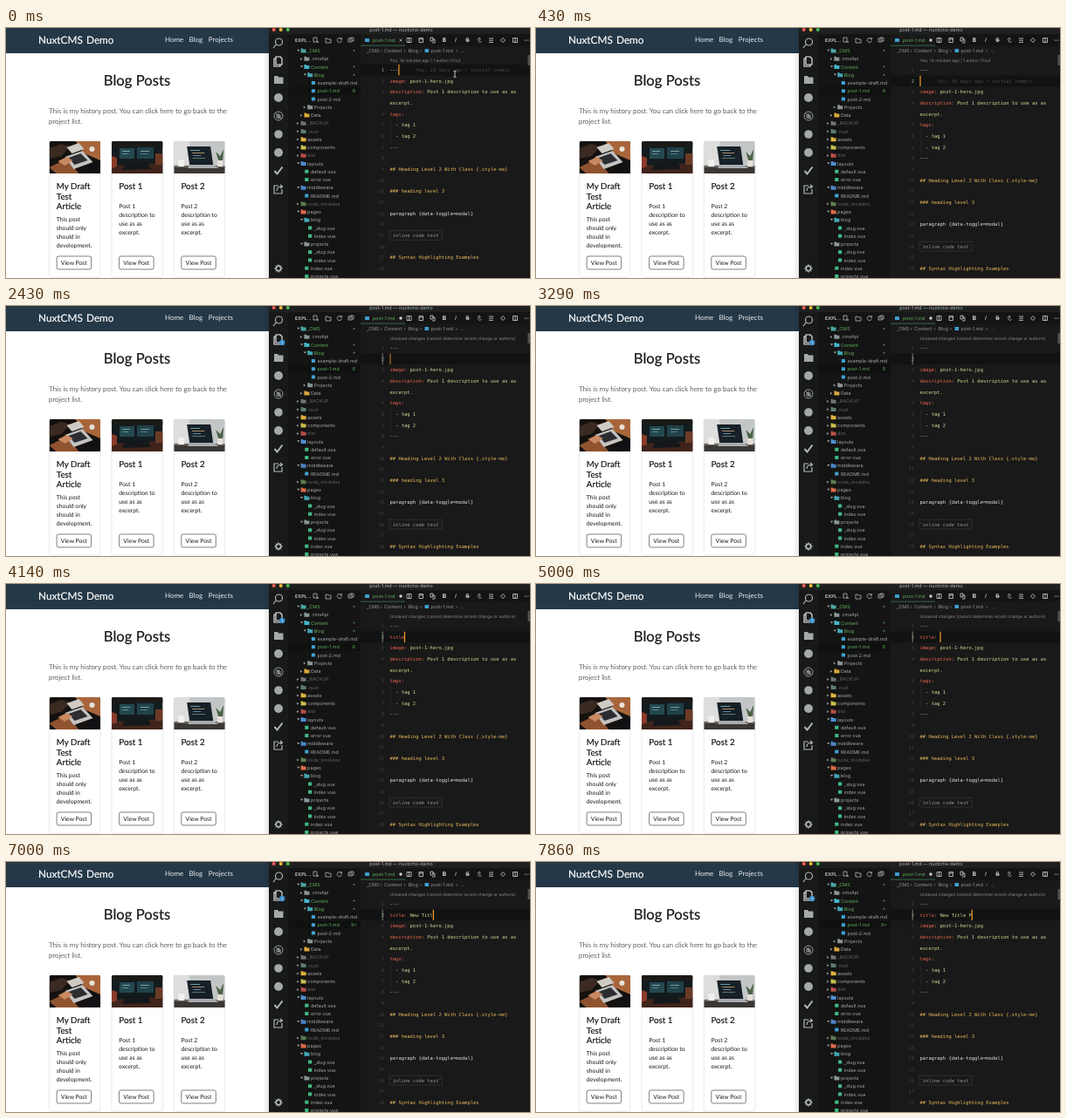
Recreate the animation shown at these times as an HTML page. Size 600 by 287 pixels, loop 8 s.

```html
<!DOCTYPE html>
<html lang="en">
<head>
<meta charset="utf-8">
<title>Blog editor</title>
<style>
html, body { margin: 0; width: 100%; height: 100%; overflow: hidden; background: #fff; }
svg { display: block; width: 600px; height: 287px; }
text { white-space: pre; text-rendering: geometricPrecision; }
.lato { font-family: Lato, sans-serif; fill: #15181b; }
.head { stroke: #15181b; stroke-width: .2; }
.brand { font-size: 11.8px; fill: #fff; stroke: #fff; stroke-width: .2; }
.lead { font-size: 8.05px; font-weight: 300; stroke: #15181b; stroke-width: .06; }
.body { font-size: 6.8px; }
.ui { font-family: Inter, sans-serif; font-size: 5.4px; fill: #a6a8a8; }
.lens { font-size: 4.8px; fill: #8c8e8e; }
.code { font-family: "DejaVu Sans Mono", monospace; font-size: 5.47px; fill: #e2e3da; }
.num { fill: #3e4041; text-anchor: end; }
.line { fill: none; stroke: #b4b8b9; stroke-width: .8; }
</style>
</head>
<body>
<svg id="stage" viewBox="0 0 600 287" xmlns="http://www.w3.org/2000/svg"></svg>
<script>
const LOOP = 8000, ROW = 12.66, LEFT = 439.5, CHAR = 5.47 * .602;
const GREEN = '#62b05c', KEY = '#e8674f', VALUE = '#cbdc92', HEAD = '#e8b95c', BLUE = '#3f9fd0';

const rect = (x, y, w, h, fill, extra = '') =>
  `<rect x="${x}" y="${y}" width="${w}" height="${h}" fill="${fill}" ${extra}/>`;
const dot = (x, y, r, fill) => `<circle cx="${x}" cy="${y}" r="${r}" fill="${fill}"/>`;
const poly = (points, fill) => `<polygon points="${points}" fill="${fill}"/>`;
const line = (d, extra = '') => `<path class="line" d="${d}" ${extra}/>`;
const text = (x, y, str, cls, style = '', id = '') =>
  `<text ${id && `id="${id}"`} x="${x}" y="${y}" class="${cls}" style="${style}">${str}</text>`;
const span = (str, fill) => `<tspan fill="${fill}">${str}</tspan>`;
const rowY = row => 50 + row * ROW;

// Website
const photos = [
  rect(0, 0, 58.5, 37, '#14110f') + poly('0,8 14,3 24,6 14,17 0,20', '#3a2a22') +
  poly('30,0 58.5,0 58.5,22 40,14', '#a8653a') + poly('0,30 20,20 34,37 8,37', '#8f5330') +
  poly('20,7 34,2 40,9 26,14', '#cfcac4') +
  poly('18,18 38,11 50,24 28,32', '#c4c3c1') + poly('22,19 36,14 44,22 29,27', '#2b2d30') +
  poly('10,23 20,18 27,22 18,28', '#c98961') + poly('40,33 47,27 58.5,22 58.5,37', '#101114') +
  dot(49, 9, 3, '#e8e2da'),
  rect(0, 0, 58.5, 37, '#131b1e') + rect(0, 0, 58.5, 6, '#1c1a17') +
  poly('0,28 58.5,25 58.5,37 0,37', '#40241b') + rect(9, 8, 17, 12, '#25484f') +
  rect(29, 7, 19, 13, '#21414a') + rect(12, 11, 9, 1, '#72a4a2') + rect(12, 14, 7, 1, '#5c8f8f') +
  rect(33, 11, 10, 1, '#7aa09b') + rect(33, 14, 8, 1, '#557f80') +
  poly('16,25 41,24 45,32 12,33', '#15181b') + rect(50, 14, 8.5, 13, '#6b3b26') +
  poly('0,17 6,19 6,29 0,31', '#8c3a2a'),
  rect(0, 0, 58.5, 37, '#c3c6c7') + rect(0, 0, 18, 27, '#dcdddc') +
  rect(0, 29, 58.5, 8, '#3b3734') + rect(0, 28, 58.5, 2, '#6e675f') +
  poly('15,6 42,6 45,27 18,27', '#182027') + rect(19, 10, 11, 1, '#65a0a4') +
  rect(21, 13, 14, 1, '#a88e6b') + rect(22, 16, 9, 1, '#608aa0') + rect(21, 19, 15, 1, '#587b72') +
  poly('18,27 45,27 51,31 16,31', '#a8acae') + rect(5, 21, 7, 8, '#f0f0ed', 'rx="1"') +
  poly('51,22 48,12 53,17 57,9 56,22', '#4c6348') + rect(50, 22, 6, 7, '#e6e2da')
];
const cards = [
  [49.5, ['My Draft', 'Test', 'Article'], 222, ['This post', 'should only', 'should in', 'development.']],
  [121, ['Post 1'], 207, ['Post 1', 'description to', 'use as as', 'excerpt.']],
  [192.2, ['Post 2'], 207, ['Post 2', 'description to', 'use as as', 'excerpt.']]
];

function card([x, title, bodyY, body], i) {
  return `<g transform="translate(${x} 130)">` +
    rect(0, .2, 58.5, 156, '#fff', 'rx="1.8" stroke="#dcdcdc" stroke-width=".6"') +
    `<g clip-path="url(#photo)">${photos[i]}</g>` +
    title.map((s, n) => text(8.3, 55 + n * 11.6, s, 'lato head', 'font-size:9.8px')).join('') +
    body.map((s, n) => text(8.3, bodyY - 130 + n * 10.1, s, 'lato body')).join('') +
    rect(8.6, 132, 39.5, 15, '#fff', 'rx="2" stroke="#454b50" stroke-width=".7"') +
    text(28.3, 142, 'View Post', 'lato body', 'text-anchor:middle') + '</g>';
}

const nav = [[182, 'Home'], [209.5, 'Blog'], [231.7, 'Projects']];
const site = rect(0, 0, 301, 287, '#fff') + rect(0, 0, 301, 29, '#243848') +
  text(37, 17.7, 'NuxtCMS', 'lato brand') + text(92, 17.7, 'Demo', 'lato brand') +
  nav.map(([x, s]) => text(x, 16, s, 'lato', 'font-size:8px;fill:#e9edf0')).join('') +
  text(150, 65.5, 'Blog Posts', 'lato head', 'font-size:16.7px;text-anchor:middle') +
  text(49, 98.4, 'This is my history post. You can click here to go back to the', 'lato lead') +
  text(49, 110.4, 'project list.', 'lato lead') +
  cards.map(card).join('') + rect(294, 0, 7, 287, 'url(#edge)');

// Editor chrome
const activity =
  line('M309 19l-3 4M308.5 16a4 4 0 1 0 8 0a4 4 0 1 0-8 0', 'style="stroke-width:1.2"') +
  line('M309 33h5l2 2v7h-7zM309 35h-2v9h7v-2', 'style="stroke:#f4f4f4;stroke-width:1.1"') +
  `<g id="count">${dot(316.2, 42, 3.2, '#3b8fca')}${text(316.2, 43.7, '1', 'ui', 'font-size:4.6px;fill:#fff;text-anchor:middle')}</g>` +
  '<path d="M307 55h4l1.2 1.5h5.3v7.5h-10.5z" fill="#a5a9aa"/>' +
  dot(312, 80, 5, '#a5a9aa') +
  line('M307 101a5 5 0 1 0 10 0a5 5 0 1 0-10 0M308.5 97.5l7 7M310 100h4v3h-4zM312 98v6') +
  dot(312, 122, 4.8, '#a5a9aa') + dot(312, 143, 5, '#a5a9aa') +
  line('M307.5 164l3 3.5l6-8', 'style="stroke-width:2"') +
  line('M312 181h-5v9h9v-5M310 187q0-5 6-5m-2-2l2.5 2l-2.5 2', 'style="stroke-width:1.2"') +
  line('M309.2 276a2.8 2.8 0 1 0 5.6 0a2.8 2.8 0 1 0-5.6 0', 'style="stroke-width:1.8"') +
  line('M312 271v10M307 276h10M308.5 272.5l7 7M315.5 272.5l-7 7', 'style="stroke-dasharray:1.6 6.8 1.6 9"');

const tree = [
  [0, '_CMS', '#47a7a4', GREEN], [1, '.cmsApi', '#8b9698'], [1, 'Content', '#43b5c5', GREEN],
  [2, 'Blog', '#43a6b5', GREEN], [3, 'example-draft.md', BLUE], [3, 'post-1.md', BLUE, GREEN],
  [3, 'post-2.md', BLUE], [2, 'Projects', '#8b9698'], [1, 'Data', '#d8a83c'],
  [0, '_BACKUP', '#6e7476', '#5f6365'], [0, '.nuxt', '#5d7c70', '#5f6365'], [0, 'assets', '#e0b33d'],
  [0, 'components', '#c7c04c'], [0, 'dist', '#b94f45', '#5f6365'], [0, 'layouts', '#4e8ed0'],
  [1, 'default.vue', '#41b883'], [1, 'error.vue', '#41b883'], [0, 'middleware', '#4d83c5'],
  [1, 'README.md', BLUE], [0, 'node_modules', '#5e7c51', '#5f6365'], [0, 'pages', '#df6a45'],
  [1, 'blog', '#43a6b5'], [2, '_slug.vue', '#41b883'], [2, 'index.vue', '#41b883'],
  [1, 'projects', '#8b9698'], [2, '_slug.vue', '#41b883'], [2, 'index.vue', '#41b883'],
  [1, 'index.vue', '#41b883'], [1, 'projects.vue', '#41b883']
];

function treeRow([depth, name, icon, fill], i) {
  const x = 337.6 + depth * 3.8, y = 26 + i * 9.25;
  const file = /\w\.(vue|md)$/.test(name);
  const open = i + 1 < tree.length && tree[i + 1][0] > depth;
  const arrow = open ? 'h3.2l-1.6 2.2z' : 'l2.2 1.5l-2.2 1.5z';
  const mark = file ? rect(x + .8, y - 2, 4.2, 4, icon, 'rx=".5"')
    : `<path d="M${x} ${y - 2.4}h2.2l.8 1h3v4h-6z" fill="${icon}"/>` +
      `<path d="M${x - 4.4} ${y - 1.2}${arrow}" fill="#a0a3a3"/>`;
  const changed = fill === GREEN && !file ? dot(398.5, y, 1, '#4d8b49') : '';
  return mark + text(x + 7.5, y + 2, name, 'ui', fill ? 'fill:' + fill : '') + changed;
}

const explorer = text(331, 16.2, 'EXPL...', 'ui', 'font-weight:600;fill:#d0d2d2') +
  line('M352 11h4v5h-4zM356 16h2M357 15v2M366 12h2l1 1h3v4h-6zM384 12.5a2.6 2.6 0 1 0 .4 2M384.5 11v2h-2M392 12h4v4h-4zM394 12v-1h4v4h-2M393 14h2', 'style="stroke-width:.8"') +
  rect(323, 67.6, 83, 9.25, '#0f1010') + tree.map(treeRow).join('');

const toolbar = line('M459 11.5h5v5h-5zM461.5 11.5v5M473 11.5h4.5v5h-4.5zM473 13h4.5M486 11h3v4h-3zM488 13h3v4h-3M540.5 15.5l3-3m-3.5 1l1-1.5q1-1 2 0M541.5 16q1 1 2 0l1-1M553 12h5M553 14.2h5M553 16.4h5M566.5 14l2.5-2.5l2.5 2.5l-2.5 2.5zM580.5 11.5h5v5h-5zM583 11.5v5M526 14h5', 'style="stroke:#d3d6d6"') +
  [['B', 502, 'font-weight:700'], ['I', 515, 'font-style:italic'], ['S', 528.5, 'font-weight:600']].map(([s, x, f]) =>
    text(x, 16.4, s, 'ui', `${f};font-size:6.6px;fill:#dfe1e1;text-anchor:middle`)).join('') +
  [594, 596, 598].map(x => dot(x, 14, .6, '#d3d6d6')).join('');

const crumbs = [[413, '_CMS'], [428.5, '›'], [433, 'Content'], [455.5, '›'], [460.5, 'Blog'], [474, '›'],
  [486.5, 'post-1.md'], [515, '›'], [520, '...']];

const chrome = rect(301, 0, 299, 287, '#191919') + rect(301, 0, 22, 287, '#181919') +
  rect(323, 0, 83, 287, '#141414') + rect(301, 0, 299, 7, '#1e1f1f') + rect(406, 7, 194, 13.5, '#141414') +
  rect(406, 7, 51, 13.5, '#191919') + rect(406, 19.7, 51, .8, '#3a7d50') +
  dot(306.7, 2, 2, '#f25c54') + dot(314.7, 2, 2, '#f0b93a') + dot(322.8, 2, 2, '#45bd4f') +
  text(452.5, 4.4, 'post-1.md — nuxtcms-demo', 'ui', 'text-anchor:middle;fill:#b8bbbb') +
  activity + explorer + rect(411, 12, 5, 4, BLUE, 'rx=".5"') +
  text(420, 16, 'post-1.md', 'ui', 'fill:' + GREEN) + toolbar +
  rect(479.5, 24, 4.6, 4, BLUE, 'rx=".5"') +
  crumbs.map(([x, s]) => text(x, 28, s, 'ui', 'fill:#949696')).join('');

// Document: [row, number, content]
const doc = [
  [1, 2, span('image: ', KEY) + span('post-1-hero.jpg', VALUE)],
  [2, 3, span('description: ', KEY) + span('Post 1 description to use as as', VALUE)],
  [3, 0, span('excerpt.', VALUE)],
  [4, 4, span('tags:', KEY)],
  [5, 5, '  - ' + span('tag 1', VALUE)],
  [6, 6, '  - ' + span('tag 2', VALUE)],
  [7, 7, '---'], [8, 8, ''],
  [9, 9, span('## Heading Level 2 With Class {.style-me}', HEAD)], [10, 10, ''],
  [11, 11, span('### heading level 3', HEAD)], [12, 12, ''],
  [13, 13, 'paragraph {data-toggle=modal}'], [14, 14, ''],
  [15, 15, span('`inline code test`', '#949792')], [16, 16, ''],
  [17, 17, span('## Syntax Highlighting Examples', HEAD)], [18, 18, '']
];
const lower = doc.map(([row, n, s]) =>
  (n ? text(433, rowY(row), n, 'code num') : '') + text(LEFT, rowY(row), s, 'code')).join('') +
  rect(LEFT + .8, rowY(5) - 8.3, .5, ROW * 2, '#303131') +
  rect(LEFT - .5, rowY(15) - 7.3, CHAR * 18 + 1, 10.8, 'none', 'stroke="#53585a" stroke-width=".6" stroke-dasharray="1 .7"');

const stage = document.getElementById('stage');
stage.innerHTML = `<defs>
  <clipPath id="photo"><path d="M0 37V2q0-2 2-2h54.5q2 0 2 2v35z"/></clipPath>
  <linearGradient id="edge"><stop stop-color="#000" stop-opacity="0"/><stop offset="1" stop-color="#000" stop-opacity=".1"/></linearGradient>
  </defs>` + site + chrome +
  `<g id="active">${rect(406, 41.8, 194, ROW, '#111212')}</g>` +
  rect(597.5, 31, 2.5, 12, '#505252') +
  text(LEFT, 39.2, '', 'ui lens', '', 'lens') +
  text(433, rowY(0), '1', 'code num', '', 'one') + text(LEFT, rowY(0), '---', 'code') +
  `<g id="lower">${lower}</g>` +
  `<g id="second">${text(433, rowY(1), '2', 'code num', 'fill:#a0a4a5')}` +
  text(LEFT, rowY(1), `<tspan id="key" fill="${KEY}"></tspan><tspan id="value" fill="${VALUE}"></tspan>`, 'code') + '</g>' +
  `<g id="gutter">${rect(430.7, rowY(1) - 8.2, 1, ROW, '#78806b')}</g>` +
  `<g id="blame">${text(0, rowY(0), 'You, 10 days ago • initial commit', 'code', 'fill:#484b4c')}</g>` +
  `<g id="caret">${rect(-.1, 42, 1.2, 12.3, '#f39c22')}</g>` +
  `<g id="mouse">${line('M512.5 49.5q1.5 0 1.5 1v5q0 1-1.5 1M515.5 49.5q-1.5 0-1.5 1M514 55.5q0 1 1.5 1', 'style="stroke:#f4f4f4"')}</g>` +
  `<g id="close">${line('M450.5 12.5l3 3M453.5 12.5l-3 3')}</g><g id="dirty">${dot(452, 14, 1.7, '#d0d3d3')}</g>` +
  text(398.5, 26 + 5 * 9.25 + 2, '6', 'ui', `fill:${GREEN};text-anchor:middle`, 'badge');

const el = {};
stage.querySelectorAll('[id]').forEach(e => el[e.id] = e);
const numbers = [...el.lower.querySelectorAll('.num')].map(e => [e, +e.textContent]);

const TYPED = 'title: New Title P', ENTER = 290, SAVED = 1430;
const KEYS = [3430, 3570, 3710, 3860, 4000, 4290, 4710, 5710, 5860, 6000, 6290,
  6570, 6710, 6860, 7000, 7140, 7430, 7710];

const show = (e, on) => e.setAttribute('opacity', +on);
const move = (e, x, y) => e.setAttribute('transform', `translate(${x} ${y})`);
const put = (e, s) => { if (e.textContent !== String(s)) e.textContent = s; };

// Each second since the last key: fade in, solid, fade out, dark
function caretAlpha(age) {
  const p = age % 1000;
  if (age >= 1000 && p < 200) return p / 200;
  if (p < 450) return 1;
  return Math.max(0, 1 - (p - 450) / 250);
}

function draw(t) {
  const entered = t >= ENTER, unsaved = t >= SAVED;
  const count = KEYS.filter(k => t >= k).length;
  const last = count ? KEYS[count - 1] : entered ? ENTER : 0;
  const shift = entered ? ROW : 0;
  move(el.lower, 0, shift);
  move(el.active, 0, shift);
  move(el.blame, LEFT + CHAR * (entered ? 6 : 9), shift);
  move(el.caret, LEFT + CHAR * (entered ? count : 3), shift);
  numbers.forEach(([e, n]) => put(e, n + entered));
  el.one.style.fill = entered ? '' : '#a0a4a5';
  put(el.lens, unsaved ? 'Unsaved changes (cannot determine recent change or authors)'
    : 'You, 14 minutes ago | 1 author (You)');
  const s = TYPED.slice(0, count);
  put(el.key, s.slice(0, 6));
  put(el.value, s.slice(6));
  put(el.badge, t >= 5290 ? '9+' : '6');
  show(el.second, entered);
  show(el.gutter, unsaved);
  show(el.count, unsaved);
  show(el.blame, !unsaved);
  show(el.mouse, !entered);
  show(el.close, !entered);
  show(el.dirty, entered);
  show(el.caret, caretAlpha(t - last));
}

function tick() {
  draw(performance.now() % LOOP);
  requestAnimationFrame(tick);
}
tick();
</script>
</body>
</html>
```
